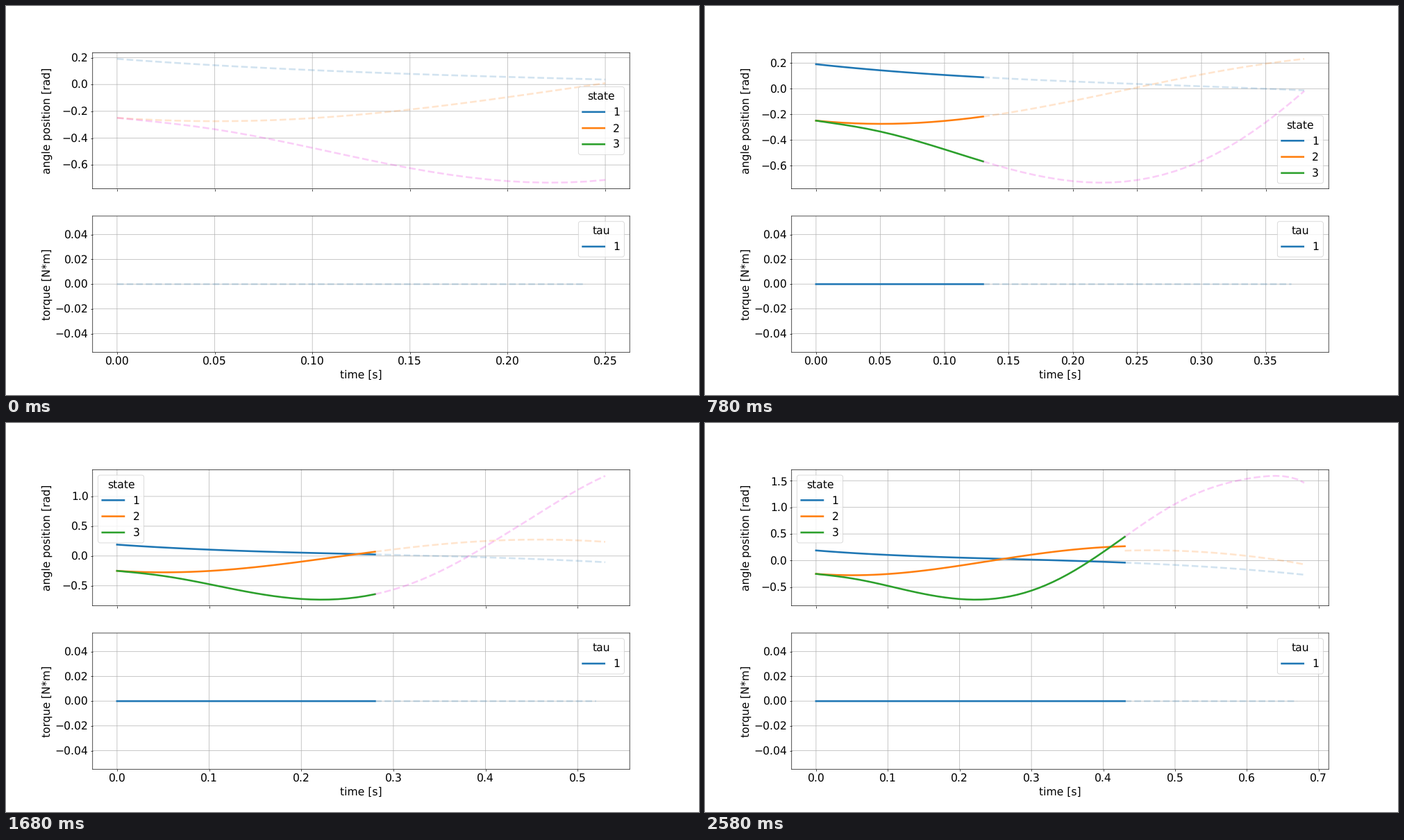
Write a matplotlib script that moves like this. It is 998x561 px and loops after 2640 ms.

```python
import numpy as np
import matplotlib.pyplot as plt
from matplotlib.animation import FuncAnimation

STEPS = 44
INTERVAL = 60
DT = 0.01
HORIZON = 25
SWITCH = 28  # step at which the predictions start to drift

plt.rcParams.update({"font.family": "DejaVu Sans", "font.size": 18,
                     "text.hinting": "none", "path.snap": False})

times = np.arange(STEPS + HORIZON) * DT


def through(t, values):
    """Polynomial through a few key points, sampled at all times."""
    return np.polynomial.Polynomial.fit(t, values, len(t) - 1)(times)


def smoothstep(x):
    x = np.clip(x, 0, 1)
    return x * x * (3 - 2 * x)


first = through([0, .1, .25, .44, .68], [.191, .107, .037, -.043, -.265])
second = through([0, .05, .15, .3, .44, .53, .68],
                 [-.249, -.274, -.187, .111, .273, .238, -.07])
third = through([0, .05, .1, .15, .25, .35, .44, .53, .62, .68],
                [-.249, -.334, -.473, -.624, -.712, -.262, .543, 1.26, 1.575, 1.46])
overshoot = 0.12 * smoothstep((times - 0.44) / 0.14)


def predict(i):
    """Predicted states from step i over the horizon."""
    part = slice(i, i + HORIZON + 1)
    late = max(i - SWITCH, 0)
    tau = np.linspace(0, 1, HORIZON + 1)
    return (first[part],
            second[part] - 0.0055 * late * (1 - tau ** 2),
            third[part] + max(1 - late / 10, 0) * overshoot[part])


fig, (top, low) = plt.subplots(2, 1, sharex=True, figsize=(16, 8.994), dpi=62.375)
top.set_ylabel("angle position [rad]")
low.set_ylabel("torque [N*m]")
low.set_xlabel("time [s]")
for ax in (top, low):
    ax.grid(True)


def line(ax, color, label=None):
    if label:
        return ax.plot([], [], color=color, lw=3, label=label)[0]
    return ax.plot([], [], color=color, lw=3, ls="--", alpha=0.2)[0]


past = [line(top, f"C{n}", str(n + 1)) for n in range(3)]
ahead = [line(top, c) for c in ("C0", "C1", "#e60cda")]
torque_past = line(low, "C0", "1")
torque_ahead = line(low, "C0")
top.legend(title="state", loc="best")
low.legend(title="tau", loc="upper right")
fig.align_ylabels()


def update(i):
    done = times[:i + 1]
    coming = times[i:i + HORIZON + 1]
    for ln, v in zip(past, (first, second, third)):
        ln.set_data(done, v[:i + 1])
    for ln, v in zip(ahead, predict(i)):
        ln.set_data(coming, v)
    torque_past.set_data(done, 0 * done)
    torque_ahead.set_data(coming[:-1], 0 * coming[:-1])
    for ax in (top, low):
        ax.relim()
    for ax in (top, low):
        ax.autoscale_view()
    return past + ahead + [torque_past, torque_ahead]


anim = FuncAnimation(fig, update, frames=STEPS, interval=INTERVAL,
                     repeat=True, repeat_delay=0, blit=False)
plt.show()
```
